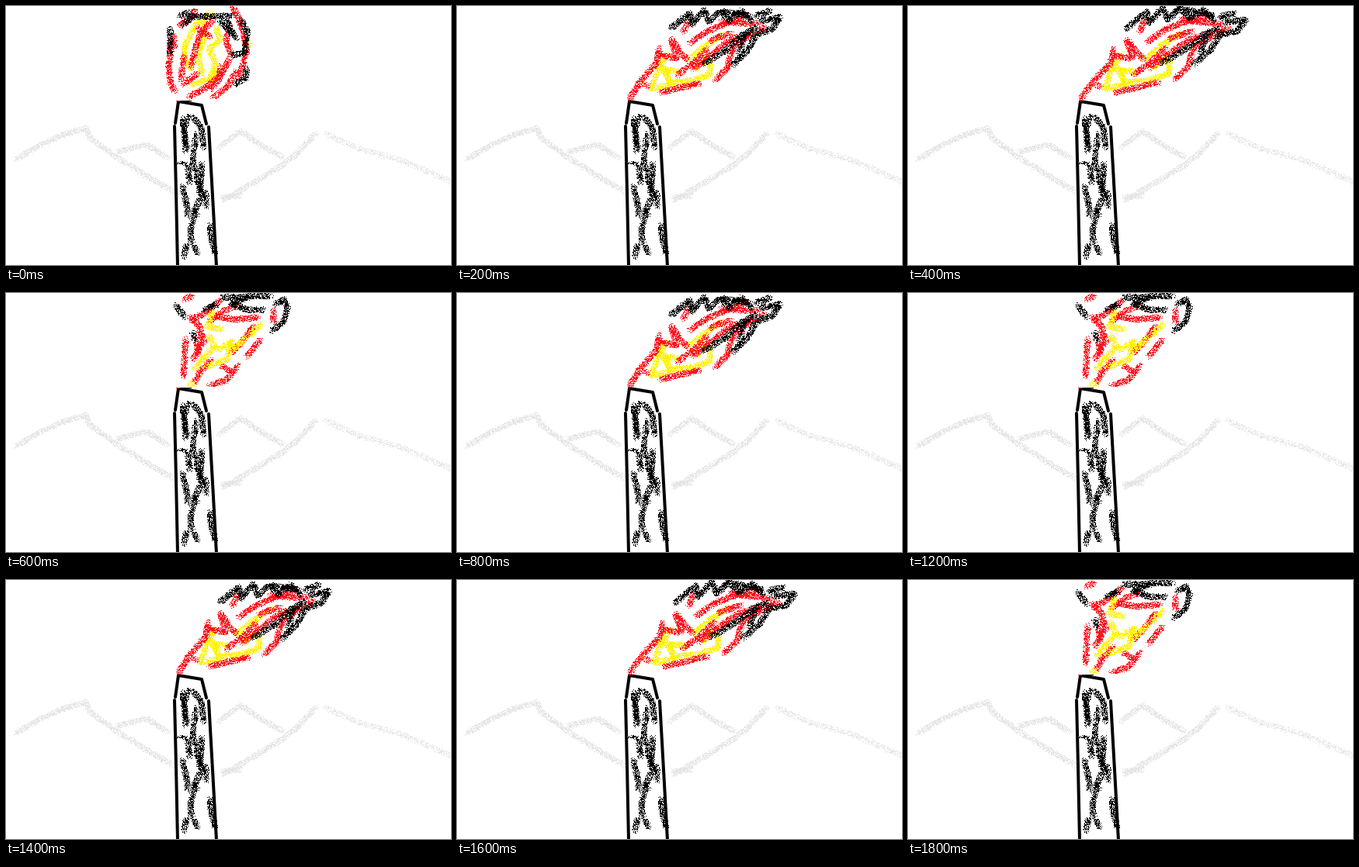
Recreate the animation shown at these times as an HTML page with a canvas. Size 573x334 px, loop 2000 ms.

```html
<!DOCTYPE html>
<html lang="en">
<head>
<meta charset="utf-8">
<title>Gas flare</title>
<style>
  html, body { margin: 0; width: 100%; height: 100%; overflow: hidden; background: #fff; }
  canvas { display: block; }
</style>
</head>
<body>
<canvas id="stage" width="573" height="334"></canvas>
<script>
const W = 573, H = 334, STEP = 200;
const RED = '#fc1420', YELLOW = '#fff200', BLACK = '#000', GREY = '#e5e5e5';

let seed = 7;
const random = () => (seed = (seed * 16807) % 2147483647) / 2147483647;

const parse = line => line.split(' ').map(p => p.split(',').map(Number));

// Airbrush: scatter single pixels in a disc that moves along each polyline.
function spray(ctx, color, lines, radius = 4.3, dots = 9, place = p => p) {
  ctx.fillStyle = color;
  for (const line of lines) {
    const points = parse(line).map(place);
    for (let i = 1; i < points.length; i++) {
      const [x0, y0] = points[i - 1], [x1, y1] = points[i];
      const length = Math.ceil(Math.hypot(x1 - x0, y1 - y0));
      for (let s = 0; s <= length; s++) {
        const k = s / (length || 1);
        for (let d = 0; d < dots; d++) {
          const a = random() * Math.PI * 2, r = Math.sqrt(random()) * radius;
          ctx.fillRect(Math.round(x0 + (x1 - x0) * k + r * Math.cos(a)),
                       Math.round(y0 + (y1 - y0) * k + r * Math.sin(a)), 1, 1);
        }
      }
    }
  }
}

function layer(draw) {
  const canvas = document.createElement('canvas');
  canvas.width = W;
  canvas.height = H;
  draw(canvas.getContext('2d'));
  return canvas;
}

const scenery = layer(ctx => {
  ctx.fillStyle = '#fff';
  ctx.fillRect(0, 0, W, H);
  spray(ctx, GREY, [
    '12,197 48,177 75,165 102,157 108,170 138,192 178,217 214,238',
    '142,188 160,183 180,178 208,195',
    '274,182 301,161 330,180 355,194',
    '279,250 300,238 355,205 375,189 398,164', '278,246 302,244'
  ], 4, 7);
  spray(ctx, GREY, ['411,164 450,182 510,199 573,226'], 4, 4);
  spray(ctx, BLACK, [
    '235,141 229,158 231,186', '227,145 232,182', '240,143 251,156 254,182',
    '244,165 240,200 247,225', '234,205 236,228', '252,203 249,240',
    '246,225 252,243 242,265 237,292 238,304', '227,232 231,250 234,270',
    '257,240 257,258', '240,306 246,318', '232,307 229,322',
    '262,282 264,300 269,318'
  ], 4.2, 8);
  spray(ctx, BLACK, ['222,202 232,203', '240,262 247,269'], 2.5, 4);
  ctx.strokeStyle = BLACK;
  ctx.lineWidth = 4;
  ctx.lineJoin = ctx.lineCap = 'round';
  for (const line of ['217,155 219,240 221,336', '218,151 222,123 252,128 258,152', '261,156 266,245 271,336']) {
    ctx.beginPath();
    parse(line).forEach(p => ctx.lineTo(...p));
    ctx.stroke();
  }
});

const upright = [
  [YELLOW, [
    '263,8 244,24 230,50 229,68 238,80', '270,28 275,43 261,55 269,72 263,94 238,101',
    '256,18 254,40 247,65 252,88', '272,84 262,98', '312,44 312,50'
  ]],
  [RED, [
    '213,45 209,78 211,98 217,109', '223,25 238,15 243,5', '215,38 216,52',
    '228,64 225,94', '268,15 250,35 244,52 238,78', '247,28 262,39', '246,87 228,100',
    '291,1 299,14 306,36 309,60 299,92', '287,24 283,45 290,63',
    '287,68 278,86 258,104 236,116', '276,78 274,94 264,106', '296,84 284,104 266,118'
  ]],
  [BLACK, [
    '211,29 211,60', '224,12 236,8', '228,23 240,13 258,13 290,12',
    '276,20 288,32 296,41', '284,18 291,35', '302,18 310,32 307,60 291,63',
    '309,81 308,92 295,100'
  ]]
];

const blown = [
  [YELLOW, [
    '270,62 258,80 250,106 274,101 268,82 286,84', '262,76 275,98 300,96 325,88 326,70',
    '296,69 318,52 341,36', '307,80 322,66'
  ]],
  [RED, [
    '222,119 234,99 257,72 260,54', '258,62 282,67 276,43 291,64 296,68', '291,33 297,20',
    '300,47 320,33 343,23 374,12', '284,88 306,71 321,55', '304,80 334,56 352,43 374,36',
    '262,111 290,104 312,99', '241,101 245,103', '332,95 347,80 354,56 378,36 396,27',
    '340,20 370,22 388,22', '326,44 352,34'
  ]],
  [BLACK, [
    '275,28 299,9 302,23 318,5 324,20 338,6 350,18 366,6 379,18', '342,7 376,12',
    '385,12 402,6', '390,19 415,14 406,29 385,36 375,55 355,75',
    '317,74 345,57 367,37 384,28', '369,38 363,60'
  ]]
];

const ragged = [
  [RED, [
    '229,8 239,4', '231,59 228,107', '237,31 249,43 254,62 240,85', '247,52 246,78',
    '238,34 258,24 275,9', '262,36 280,22 299,16', '272,30 295,34 324,31',
    '318,43 305,60 290,76', '327,60 310,81', '262,119 283,112 298,93', '278,94 290,101',
    '242,115 250,100 264,86', '344,22 344,37'
  ]],
  [YELLOW, [
    '266,22 259,43 277,46', '261,55 268,69 252,85 243,97', '256,95 284,85 290,62 272,73',
    '290,74 308,58', '314,53 327,40', '236,117 242,117'
  ]],
  [BLACK, [
    '218,15 229,30', '255,21 271,14', '240,51 243,60',
    '278,5 311,5 290,13 309,21 331,21', '312,3 340,4', '346,14 357,8 362,18 357,37 342,48'
  ]]
];

// The strongest gust stretches the blown flame sideways and flattens it.
const gust = ([x, y]) => [220 + (x - 220) * 1.097, y + 4 * Math.sin(x / 30) * (1 - y / 121)];

function scene(flame, openTop, place) {
  return layer(ctx => {
    ctx.drawImage(scenery, 0, 0);
    if (openTop) {
      ctx.clearRect(216, 110, 46, 12);
      ctx.fillStyle = BLACK;
      ctx.fillRect(222, 122, 17, 1);
      ctx.fillStyle = RED;
      ctx.fillRect(219, 122, 5, 1);
    }
    ctx.save();
    ctx.beginPath();
    ctx.rect(0, 0, W, openTop ? 121 : 125);
    ctx.clip();
    for (const [color, lines] of flame) spray(ctx, color, lines, 4.3, 9, place);
    ctx.restore();
  });
}

const A = scene(upright, true);
const B = scene(blown, false);
const C = scene(ragged, true);
const D = scene(blown, false, gust);
const loop = [A, B, D, C, B, A, C, B, D, C];

const stage = document.getElementById('stage').getContext('2d');
function draw() {
  stage.fillStyle = '#fff';
  stage.fillRect(0, 0, W, H);
  stage.drawImage(loop[Math.floor(performance.now() / STEP) % loop.length], 0, 0);
  requestAnimationFrame(draw);
}
draw();
</script>
</body>
</html>
```
